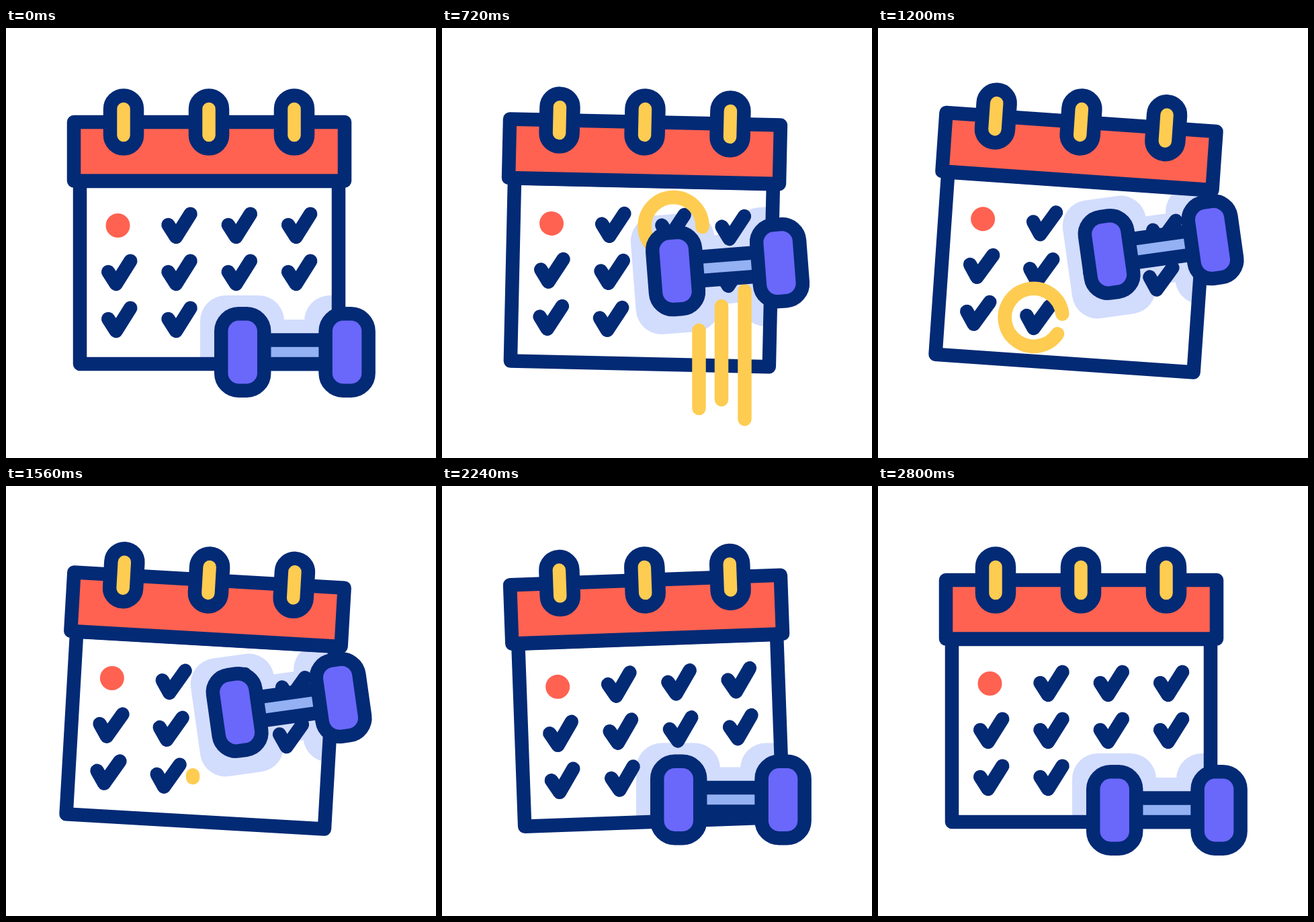
An HTML page with a canvas for the animation above (3000 ms loop, 640 by 640 pixels).

```html
<!DOCTYPE html>
<html lang="en">
<head>
<meta charset="utf-8">
<title>Workout calendar</title>
<style>
html, body { margin: 0; width: 100%; height: 100%; overflow: hidden; background: #fff; }
canvas { display: block; width: 100vw; height: 100vh; object-fit: contain; }
</style>
</head>
<body>
<canvas id="stage"></canvas>
<script>
const SIZE = 640, LOOP = 3000, STEP = 40, END = 2800;
const NAVY = '#032a75', RED = '#ff6251', YELLOW = '#fecc51';
const PURPLE = '#6a67fb', SKY = '#93b1f3', SHADE = '#d2dcfd';

const canvas = document.getElementById('stage');
const ctx = canvas.getContext('2d');
const dpr = window.devicePixelRatio || 1;
canvas.width = canvas.height = SIZE * dpr;

const clamp = u => Math.max(0, Math.min(1, u));
const smooth = u => u * u * (3 - 2 * u);
const span = (t, start, length) => clamp((t - start) / length);
const mix = (a, b, u) => a + (b - a) * u;

// Keyframes as [time, value], eased in and out between neighbours
function track(t, keys) {
  let [time, value] = keys[0];
  for (const [nextTime, nextValue] of keys) {
    if (t < nextTime) return mix(value, nextValue, smooth(span(t, time, nextTime - time)));
    [time, value] = [nextTime, nextValue];
  }
  return value;
}

const TILT = [[400, 0], [1240, 4], [1360, 4], [2320, -2.2], [2800, 0]];
const LIFT = [[200, 482], [400, 498], [835, 325], [1795, 325], [2080, 498],
              [2240, 466.5], [2420, 486], [2620, 482]];
const SWING = [[400, 0], [1000, -8], [1715, -8], [2080, 0]];

// Trails hang below the dumbbell; top and bottom are relative to its centre
const TRAILS = [
  { x: 382.5, top: 95, bottom: 211, start: 420, drop: 0 },
  { x: 416, top: 59, bottom: 198, start: 410, drop: 0 },
  { x: 450.5, top: 36, bottom: 227, start: 390, drop: 13 }
];
const CIRCLES = [
  { x: 348, y: 294, start: 220 },
  { x: 252, y: 435, start: 770 }
];

function stroke(color) {
  ctx.strokeStyle = color;
  ctx.stroke();
}

function box(x, y, w, h, r, fill, line) {
  ctx.beginPath();
  ctx.roundRect(x, y, w, h, r);
  if (fill) {
    ctx.fillStyle = fill;
    ctx.fill();
  }
  if (line) stroke(line);
}

function segment(x1, y1, x2, y2, color) {
  ctx.beginPath();
  ctx.moveTo(x1, y1);
  ctx.lineTo(x2, y2);
  stroke(color);
}

function turn(x, y, degrees) {
  ctx.translate(x, y);
  ctx.rotate(degrees * Math.PI / 180);
  ctx.translate(-x, -y);
}

function tiltCalendar(t) {
  turn(302, 140, track(t, TILT));
}

// The dumbbell swings around the middle of its lower edge
function placeDumbbell(t) {
  ctx.translate(0, track(t, LIFT) - 482);
  turn(430, 546, track(t, SWING));
}

function drawShade(t) {
  ctx.save();
  ctx.save();
  tiltCalendar(t);
  ctx.beginPath();
  ctx.rect(110, 228, 385, 272);
  ctx.restore();
  ctx.clip();
  placeDumbbell(t);
  box(289, 398, 125, 177, 38, SHADE);
  box(444, 398, 126, 177, 38, SHADE);
  box(400, 434, 60, 103, 0, SHADE);
  ctx.restore();
}

function drawChecks() {
  for (let i = 1; i < 10; i++) {
    const x = 163.7 + i % 4 * 89.3;
    const y = 311 + Math.floor(i / 4) * 70;
    ctx.beginPath();
    ctx.moveTo(x - 11.5, y - 18);
    ctx.lineTo(x, y);
    ctx.lineTo(x + 21.5, y - 34.3);
    stroke(NAVY);
  }
  ctx.beginPath();
  ctx.arc(166.5, 294, 18, 0, Math.PI * 2);
  ctx.fillStyle = RED;
  ctx.fill();
}

function drawCircle(t, { x, y, start }) {
  const head = smooth(span(t, start, 480));
  const tail = smooth(span(t, start + 344, 480));
  if (head <= tail) return;
  ctx.beginPath();
  ctx.arc(x, y, 43, tail * Math.PI * 2, head * Math.PI * 2);
  stroke(YELLOW);
}

function drawCalendar(t) {
  ctx.save();
  tiltCalendar(t);
  drawChecks();
  box(110, 228, 385, 272, 0, null, NAVY);
  box(101, 140, 403, 87.5, 0, RED, NAVY);
  for (const x of [175, 302, 429]) box(x - 20, 100.5, 40, 79, 20, YELLOW, NAVY);
  CIRCLES.forEach(c => drawCircle(t, c));
  ctx.restore();
}

function drawTrail(t, { x, top, bottom, start, drop }) {
  const u = span(t, start, 300);
  const grow = u * (2 - u);
  const fade = smooth(span(t, 760, 320));
  if (grow === 0 || fade === 1) return;
  const base = track(t, LIFT);
  const from = top + drop * (1 - grow);
  const to = mix(from, bottom, grow);
  segment(x, base + mix(from, to, fade), x, base + to, YELLOW);
}

function drawDumbbell(t) {
  ctx.save();
  placeDumbbell(t);
  box(384, 464.5, 92, 35.5, 0, SKY);
  segment(384, 464.5, 476, 464.5, NAVY);
  segment(384, 500, 476, 500, NAVY);
  box(320.2, 425.3, 64, 114.4, 26, PURPLE, NAVY);
  box(475.6, 425.3, 64, 114.4, 26, PURPLE, NAVY);
  ctx.restore();
}

function draw(t) {
  ctx.setTransform(dpr, 0, 0, dpr, 0, 0);
  ctx.fillStyle = '#fff';
  ctx.fillRect(0, 0, SIZE, SIZE);
  ctx.lineWidth = 20.5;
  ctx.lineCap = ctx.lineJoin = 'round';
  drawShade(t);
  drawCalendar(t);
  TRAILS.forEach(trail => drawTrail(t, trail));
  drawDumbbell(t);
}

const begin = performance.now();

function tick() {
  const t = (performance.now() - begin) % LOOP;
  draw(Math.min(END, Math.floor(t / STEP) * STEP));
  requestAnimationFrame(tick);
}
tick();
</script>
</body>
</html>
```
